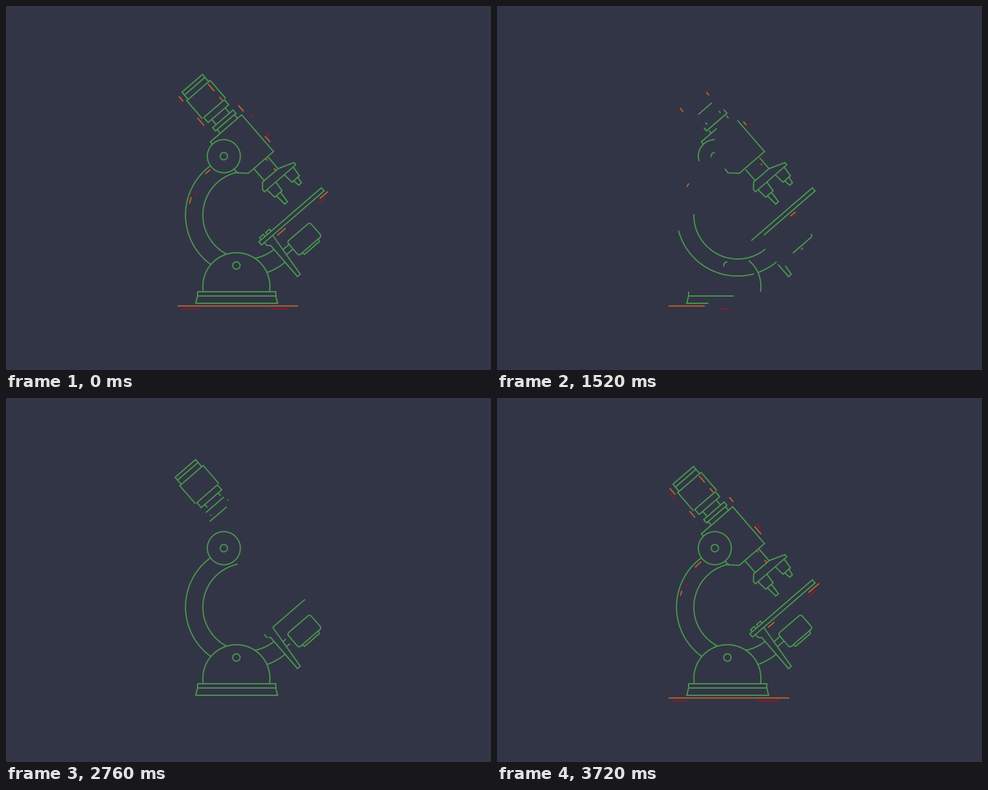
Animation of 800 by 600 pixels, one loop 3.76 s. Source, as an HTML page with a canvas:

```html
<!DOCTYPE html>
<html lang="en">
<head>
<meta charset="utf-8">
<title>Microscope</title>
<style>
  html, body { margin: 0; width: 100%; height: 100%; overflow: hidden; background: #323545; }
  canvas { display: block; }
</style>
</head>
<body>
<canvas id="stage" width="800" height="600"></canvas>
<script>
const ctx = document.getElementById('stage').getContext('2d');
const BG = '#323545', GREEN = '#4a9650', ORANGE = '#c0632c', RED = '#8d1a35';
const LOOP = 3760, OUT = 460, IN = 540, HEAD_START = 2080, HEAD_SHIFT = 25.3;

const clamp = x => Math.max(0, Math.min(1, x));
const smooth = x => { x = clamp(x); return x * x * (3 - 2 * x); };

// ---- geometry -------------------------------------------------------------

// Tilted frame: origin at the top of the eyepiece, y running down the optical axis.
const TILT = -40.85 * Math.PI / 180, COS = Math.cos(TILT), SIN = Math.sin(TILT);
const tilt = pts => pts.map(([x, y]) => [307.2 + x * COS - y * SIN, 127.5 + x * SIN + y * COS]);

const box = (x0, x1, y0, y1) => [[x0, y0], [x1, y0], [x1, y1], [x0, y1]];

// Open cup around x, half widths w0 (open side) and w1 (bottom).
const cup = (x, y0, y1, w0, w1 = w0) => [[x - w0, y0], [x - w1, y1], [x + w1, y1], [x + w0, y0]];

function arc(cx, cy, r, from, to) {
  const steps = 90;
  return Array.from({ length: steps + 1 }, (_, i) => {
    const a = (from + (to - from) * i / steps) * Math.PI / 180;
    return [cx + r * Math.cos(a), cy + r * Math.sin(a)];
  });
}
const circle = (cx, cy, r) => arc(cx, cy, r, -90, 270);

// Rounded box that starts in the middle of its left side.
function roundBox(cx, cy, w, h, r) {
  const pts = [[cx - w, cy]];
  for (let i = 0; i < 4; i++) {
    const right = i === 1 || i === 2 ? 1 : -1, low = i > 1 ? 1 : -1;
    pts.push(...arc(cx + right * (w - r), cy + low * (h - r), r, 180 + 90 * i, 270 + 90 * i));
  }
  return pts;
}

function measure(pts) {
  const at = [0];
  for (let i = 1; i < pts.length; i++)
    at.push(at[i - 1] + Math.hypot(pts[i][0] - pts[i - 1][0], pts[i][1] - pts[i - 1][1]));
  return { pts, at, total: at[at.length - 1] };
}

function pointAt({ pts, at }, d) {
  let i = 1;
  while (i < at.length - 1 && at[i] < d) i++;
  const k = (d - at[i - 1]) / (at[i] - at[i - 1]);
  return [0, 1].map(n => pts[i - 1][n] + (pts[i][n] - pts[i - 1][n]) * k);
}

// ---- painting -------------------------------------------------------------

function paint(color, fill) {
  if (fill) { ctx.fillStyle = BG; ctx.fill(); }
  ctx.strokeStyle = color;
  ctx.stroke();
}

// Draws the stretch from a to b (fractions of the length), wrapping past the ends.
function drawTrimmed(line, a, b, color, fill) {
  const base = Math.floor(a);
  for (const turn of [base, base + 1]) {
    const from = clamp(a - turn) * line.total, to = clamp(b - turn) * line.total;
    if (to - from < 1) continue;
    ctx.beginPath();
    ctx.moveTo(...pointAt(line, from));
    line.pts.forEach((p, i) => {
      if (line.at[i] > from && line.at[i] < to) ctx.lineTo(...p);
    });
    ctx.lineTo(...pointAt(line, to));
    paint(color, fill);
  }
}

function drawWhole(line, closed, color, fill) {
  ctx.beginPath();
  line.pts.forEach(p => ctx.lineTo(...p));
  if (closed) ctx.closePath();
  paint(color, fill);
}

// ---- parts ----------------------------------------------------------------

const parts = [], dashes = [];

// hideAt/showAt: [anchor, share of the visible stretch before the anchor].
const END = [1, 1];
const around = c => [c, 0.5];

function part(pts, time, options = {}) {
  if (options.closed) pts = [...pts, pts[0]];
  parts.push({ line: measure(pts), hideAt: END, showAt: [0, 0], color: GREEN, ...time, ...options });
}

// The head is wiped and redrawn in sweeps that travel down the axis.
const SWEEPS = [
  { y: 0, hide: 1075, hideLag: 0, show: 2070, showLag: 1 },
  { y: 15, hide: 1075, hideLag: 3.5, show: 2165, showLag: 1.2 },
  { y: 65, hide: 1253, hideLag: 5, show: 2460, showLag: 6 },
  { y: 172, hide: 1440, hideLag: 2.7, show: 2805, showLag: 5.3 }
];

function head(pts, options) {
  const y = Math.min(...pts.map(p => p[1]));
  const s = SWEEPS.filter(s => s.y <= y).pop();
  part(tilt(pts), {
    hide: s.hide + (y - s.y) * s.hideLag,
    show: s.show + (y - s.y) * s.showLag,
    head: true
  }, options);
}

function sides(w, y0, y1) {
  for (const x of [-w, w]) head([[x, y0], [x, y1]]);
}

const BASE = { hide: 1228, show: 2185 };
const ARM = { hide: 1330, show: 2241 };
const TABLE = { hide: 1421, show: 2587 };
const CLIP = { hide: 1060, show: 3000 };
const BRACKET = { hide: 1228, show: 2250 };
const LAMP = { hide: 1228, show: 2070 };
const LAMP_FOOT = { hide: 1157, show: 2207 };
const LAMP_PINS = { hide: 1060, show: 2490 };
const GROUND = { hide: 1228, show: 2784 };
const DASHES = { hide: 1228, show: 2824 };

// curved arm
part(arc(397, 344.7, 72.3, 259, 50.8), ARM, { showAt: END });
part(arc(396.7, 344.5, 100.6, 234, 50.2), ARM, { showAt: END });

// base
part([[325, 471], ...arc(380, 462, 55.3, 180, 360), [435, 471]], BASE, { fill: true });
part(circle(380, 427.7, 6), BASE);
part(box(316, 445, 471, 478), BASE, { closed: true });
part(cup(380.5, 478, 490, 64.5, 67.5).reverse(), BASE);
part([[482, 494.5], [283, 494.5]], GROUND, { color: ORANGE });

// eyepiece and neck
head(box(-22.3, 22.3, 0, 6.2), { closed: true, showAt: around(0.16), hideAt: around(0.66) });
sides(22.3, 6.2, 15.6);
head(cup(0, 55.1, 15.6, 25.5));
head(box(-22.4, 22.4, 55.1, 66), { closed: true, showAt: END, hideAt: around(0.2) });
sides(14.6, 66, 77.3);
head(box(-22.2, 22.2, 77.3, 84.4), { closed: true });
sides(18.9, 84.4, 92.4);

// body and knob
head([[-40.4, 98], [-40.4, 92.5], [27.8, 92.5], [27.8, 172.7], [-27, 172.7], [-40.6, 159.8], [-40, 151.3]],
  { showAt: around(0.16), hideAt: around(0.764) });
part(circle(359.3, 247.5, 27.2), BASE, { fill: true });
part(circle(359.3, 247.5, 6), BASE);

// nosepiece and its two lenses
sides(15.1, 172.7, 199);
head([[4, 199], [-18.7, 199], [-27, 208.5], [-27, 213.2], [41.4, 213.2], [41.4, 208.5], [15.4, 199]],
  { closed: true, showAt: around(0), hideAt: around(0.5) });
for (const [x, tip] of [[-11.8, 250.3], [26, 241.8]]) {
  head(cup(x, 213.2, 230.9, 9.7, 8.1));
  head(cup(x, 230.9, tip, 4.5, 3));
}

// table with clips and bracket
part(tilt(box(-87.8, 48.5, 269.5, 276.3)), TABLE, { closed: true, showAt: [0.89, 1], hideAt: [0.89, 1] });
for (const x of [-78.3, -65]) part(tilt(cup(x, 269.5, 265.1, 4.2)), CLIP);
part(tilt([[-81.7, 276.3], [-81.5, 282.5], [-77, 287], [-77, 354.5], [-71, 354.5], [-63.5, 276.3]]),
  BRACKET, { showAt: around(0.55), hideAt: around(0.475) });

// lamp
part(tilt(roundBox(-28, 315, 24.8, 15, 4)), LAMP, { closed: true, showAt: around(0.5), hideAt: around(0.72) });
part(tilt(cup(-28, 330, 334.4, 18, 16).reverse()), LAMP_FOOT, { hideAt: around(0.55) });
for (const y of [305.2, 315.3]) part(tilt([[-66.3, y], [-53, y]]), LAMP_PINS);

// running dashes
function dash(pts, color, width = 0.33, center = 0) {
  dashes.push({ line: measure(pts), color, width, center });
}
const down = (x, from, to) => tilt([[x, from], [x, to]]);
const across = (y, from, to) => tilt([[from, y], [to, y]]);

dash(down(-30.7, 65.5, 1.7), ORANGE, 0.44, 0.045);
dash(down(19.2, 18, 53.4), ORANGE, 0.64, 0.115);
dash(down(33.9, 77.2, 157.2), ORANGE);
dash(down(10.3, 173.2, 198.3), ORANGE);
dash(across(281.3, -58.1, 52.9), ORANGE);
dash(arc(396.8, 344.6, 95.8, 191.3, 231.4), ORANGE);
dash(down(-36.4, 60.3, 8.2), RED, 0.22, -0.05);
dash(down(39.4, 101, 148.4), RED);
dash(across(286.5, -32.9, 40.5), RED, 0.22, -0.07);
dash(arc(396.8, 344.6, 91.3, 185.4, 205), RED, 0.22, -0.07);
dash([[290, 499.5], [466, 499.5]], RED);

// ---- motion ---------------------------------------------------------------

function visible(t, { hide, show }) {
  return t < show ? 1 - smooth((t - hide) / OUT) : smooth((t - show) / IN);
}

// Ease with a long tail: cubic-bezier(.33, 0, .35, 1), solved by Newton steps.
function headOffset(t) {
  if (t < HEAD_START) return 0;
  const x = (t - HEAD_START) / (LOOP - HEAD_START);
  let p = x;
  for (let i = 0; i < 6; i++)
    p -= (0.99 * p - 0.93 * p * p + 0.94 * p ** 3 - x) / (0.99 - 1.86 * p + 2.82 * p * p);
  return -HEAD_SHIFT * (1 - smooth(p));
}

// Four rounds per loop, a little slower at first.
function flow(t) {
  const u = t / LOOP;
  return 4 * (u - 0.226 * u * (1 - u) ** 2);
}

function draw(t) {
  ctx.fillStyle = BG;
  ctx.fillRect(0, 0, 800, 600);
  ctx.lineWidth = 2;
  const shift = headOffset(t);

  for (const p of parts) {
    const v = visible(t, p);
    if (v <= 0) continue;
    ctx.save();
    if (p.head) ctx.translate(shift, shift);
    if (v >= 1) drawWhole(p.line, p.closed, p.color, p.fill);
    else {
      const [anchor, before] = t < p.show ? p.hideAt : p.showAt;
      const a = anchor - before * v;
      drawTrimmed(p.line, a, a + v, p.color, p.fill);
    }
    ctx.restore();
  }

  const v = visible(t, DASHES);
  for (const d of dashes) {
    const a = d.center + flow(t) - d.width * v / 2;
    drawTrimmed(d.line, a, a + d.width * v, d.color);
  }
}

const began = performance.now();
function tick() {
  draw((performance.now() - began) % LOOP);
  requestAnimationFrame(tick);
}
tick();
</script>
</body>
</html>
```
